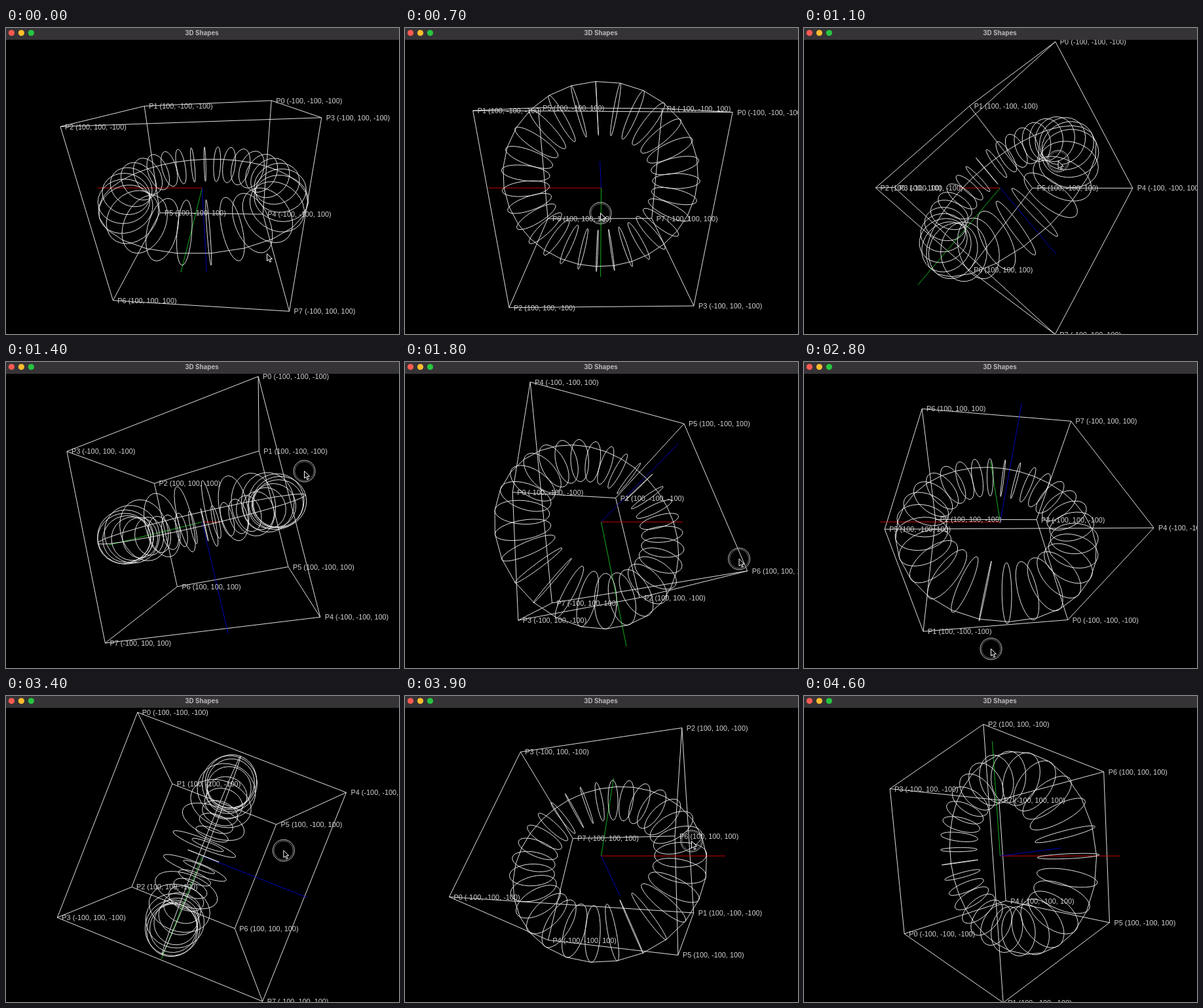
Write an HTML page that moves like this. It is 600 px wide and 467 px high and loops after 4900 ms.

```html
<!DOCTYPE html>
<html lang="en">
<head>
<meta charset="utf-8">
<title>3D Shapes</title>
<style>
  html, body { margin: 0; width: 100%; height: 100%; overflow: hidden; background: #000; }
  svg { display: block; width: 100vw; height: 100vh; }
  path { fill: none; stroke: #ececec; stroke-width: 0.95; stroke-linejoin: round; }
  #labels text { font: 10.9px "Liberation Sans", Arial, sans-serif; fill: #d2d2d2; }
  #title { font: 700 9.8px Inter, Roboto, sans-serif; fill: #b8b6b8; text-anchor: middle; }
  #ring circle { fill: none; }
  #arrow { fill: #000; stroke: #fff; stroke-width: 1; }
</style>
</head>
<body>
<svg viewBox="0 0 600 467">
  <rect width="600" height="467" fill="#000"/>
  <path id="cube"/>
  <path id="axisX" style="stroke:#d80000"/>
  <path id="axisY" style="stroke:#14b81e"/>
  <path id="axisZ" style="stroke:#0000c4"/>
  <path id="torus"/>
  <g id="labels"></g>
  <rect width="600" height="18" fill="#353336"/>
  <circle cx="8.4" cy="7.5" r="4.6" fill="#ff5a52"/>
  <circle cx="23.4" cy="7.5" r="4.6" fill="#fdbc2e"/>
  <circle cx="38.4" cy="7.5" r="4.6" fill="#27c63f"/>
  <text id="title" x="299" y="10.6">3D Shapes</text>
  <g id="cursor">
    <g id="ring">
      <circle r="16.5" stroke="#c4c4c4"/>
      <circle r="14.6" stroke="#6e6e6e"/>
    </g>
    <path id="arrow" d="M0 0V11L2.6 8.7L4.4 12.8L6.2 12L4.4 8H8Z"/>
  </g>
</svg>
<script>
const LOOP = 4900, STEP = 100;
const PRESS = 200, RELEASE = 4200, LEAVE = 4500, END = 4600;
const FOCAL = 340, DIST = 300, CX = 299.5, CY = 244.1;
const SIZE = 100, AXIS = 150, MAJOR = 100, MINOR = 30, SIDES = 29;
const TAU = Math.PI * 2, RAD = Math.PI / 180;
const $ = id => document.getElementById(id);

// time, pitch, yaw
const turns = [
  [PRESS, -65.5, 173.4],
  [700, 20.4, 181],
  [1400, -76.5, 75.5],
  [2100, 107, 21.8],
  [2800, 136.9, 189.8],
  [3400, -21.6, 88.7],
  [RELEASE, -185.4, -47]
];
// time, x, y while dragging
const drags = [
  [PRESS, 308, 170],
  [700, 298.5, 282.5],
  [1400, 455.5, 166.5],
  [2100, 507.8, 407.8],
  [2800, 285.5, 437.7],
  [3400, 423.8, 235.7],
  [RELEASE, 433, 230]
];

const corners = [
  [-1, -1, -1], [1, -1, -1], [1, 1, -1], [-1, 1, -1],
  [-1, -1, 1], [1, -1, 1], [1, 1, 1], [-1, 1, 1]
].map(p => p.map(n => n * SIZE));

const labels = corners.map((p, i) => {
  const text = document.createElementNS("http://www.w3.org/2000/svg", "text");
  text.textContent = `P${i} (${p.join(", ")})`;
  return $("labels").appendChild(text);
});

const range = (n, fn) => Array.from({ length: n }, (_, i) => fn(i));
const mix = (a, b, k) => a + (b - a) * k;

function torusPoint(i, j) {
  const a = i / SIDES * TAU, b = j / SIDES * TAU;
  const r = MAJOR + MINOR * Math.cos(b);
  return [r * Math.cos(a), r * Math.sin(a), MINOR * Math.sin(b)];
}
const rings = range(SIDES, i => range(SIDES, j => torusPoint(i, j)));
rings.push(range(SIDES, i => torusPoint(i, 0)));

// Smooth curve through the rows, at rest at both ends
function follow(rows, t) {
  const last = rows.length - 1;
  if (t <= rows[0][0]) return rows[0].slice(1);
  if (t >= rows[last][0]) return rows[last].slice(1);
  const i = rows.findIndex(r => r[0] > t) - 1;
  const slope = (n, c) => n === 0 || n === last ? 0 :
    (rows[n + 1][c] - rows[n - 1][c]) / (rows[n + 1][0] - rows[n - 1][0]);
  const a = rows[i], b = rows[i + 1], span = b[0] - a[0];
  const k = (t - a[0]) / span, k2 = k * k, k3 = k2 * k;
  return [1, 2].map(c =>
    a[c] * (2 * k3 - 3 * k2 + 1) + b[c] * (3 * k2 - 2 * k3) +
    span * (slope(i, c) * (k3 - 2 * k2 + k) + slope(i + 1, c) * (k3 - k2)));
}

function camera(pitch, yaw) {
  const sp = Math.sin(pitch * RAD), cp = Math.cos(pitch * RAD);
  const sy = Math.sin(yaw * RAD), cy = Math.cos(yaw * RAD);
  return ([x, y, z]) => {
    const u = sp * y + cp * z;
    const k = FOCAL / (DIST + x * sy - u * cy);
    return [CX + k * (x * cy + u * sy), CY + k * (cp * y - sp * z)];
  };
}

const line = pts => "M" + pts.map(p => p[0].toFixed(2) + " " + p[1].toFixed(2)).join("L");

function drawScene(t) {
  const project = camera(...follow(turns, t));
  const pts = corners.map(project);
  const sides = range(4, i => line([pts[i], pts[i + 4]])).join("");
  $("cube").setAttribute("d",
    line(pts.slice(0, 4)) + "Z" + line(pts.slice(4)) + "Z" + sides);
  $("torus").setAttribute("d", rings.map(r => line(r.map(project)) + "Z").join(""));
  ["X", "Y", "Z"].forEach((name, n) => {
    const end = range(3, i => i === n ? AXIS : 0);
    $("axis" + name).setAttribute("d", line([[0, 0, 0], end].map(project)));
  });
  labels.forEach((text, i) => {
    text.setAttribute("x", (pts[i][0] + 7).toFixed(2));
    text.setAttribute("y", (pts[i][1] + 4).toFixed(2));
  });
}

function drawCursor(t) {
  let [x, y] = follow(drags, t);
  if (t < PRESS) {
    x = mix(398.5, x, t / PRESS);
    y = mix(344.5, y, t / PRESS);
  } else if (t > RELEASE) {
    const k = Math.min(1, (t - RELEASE) / (LEAVE - RELEASE));
    x = mix(x, 6, k);
    y = mix(y, 6, k);
  }
  $("cursor").setAttribute("transform", `translate(${x.toFixed(2)} ${y.toFixed(2)})`);
  $("cursor").style.display = t < END ? "" : "none";
  $("ring").style.display = t >= PRESS && t <= RELEASE ? "" : "none";
}

let shown = -1;
const start = performance.now();
function tick() {
  const now = (performance.now() - start) % LOOP;
  const t = Math.min(END, Math.floor(now / STEP) * STEP);
  if (t !== shown) {
    shown = t;
    drawScene(t);
    drawCursor(t);
  }
  requestAnimationFrame(tick);
}
tick();
</script>
</body>
</html>
```
